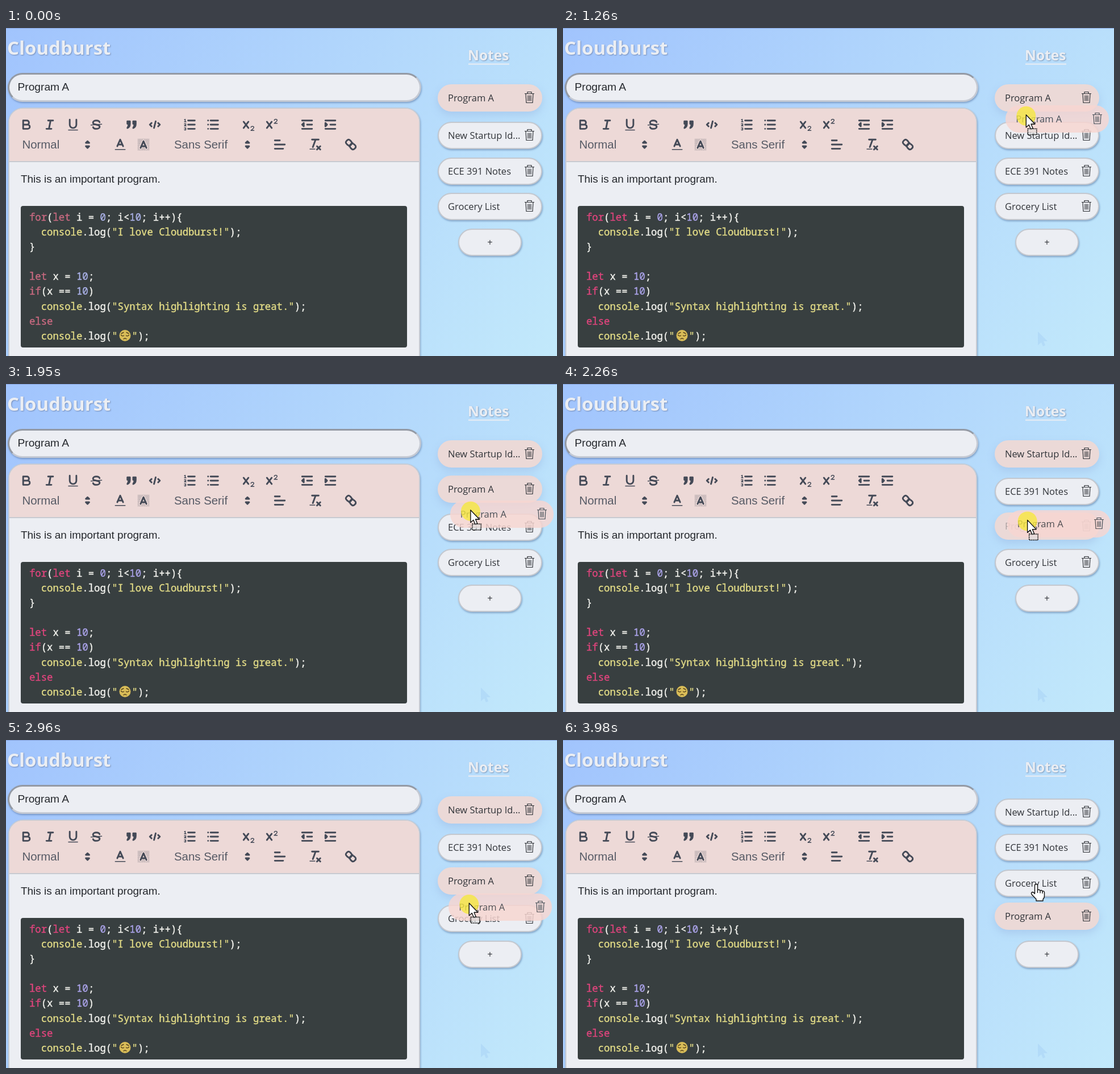
Animation, 970 px wide and 577 px high, one loop 4.05 s. Source, as an HTML page:

```html
<!DOCTYPE html>
<html lang="en">
<head>
<meta charset="utf-8">
<title>Notes editor</title>
<style>
html, body { margin: 0; width: 100%; height: 100%; overflow: hidden; }
body { position: relative; background: linear-gradient(120deg, #a1c4fd, #c2e9fb); }
body > * { position: absolute; box-sizing: border-box; }
svg { overflow: visible; }
#topline { left: 0; top: 0; width: 100%; height: 1px; background: #86a3dd; }
#title, #editor, .pill { background: #eceef3; box-shadow: 1px 2px 3px rgba(60, 90, 140, .45); }
#title { left: 3px; top: 79px; width: 728px; height: 51px; border: 3px solid; border-radius: 26px;
  border-color: #949aa4 #c4c9d3 #c4c9d3 #949aa4; }
#editor { left: 4px; top: 140px; width: 725px; height: 460px; border: 2px solid #c8ccd4;
  border-radius: 26px 26px 0 0; overflow: hidden; }
#bar { height: 92px; background: #edd9d7; border-bottom: 2px solid #c8cad1; }
#code { left: 26px; top: 313px; width: 680px; height: 249px; margin: 0; padding: 7px 15px; border-radius: 4px;
  background: #383f40; color: #f5f5f0; font: 500 17.3px/26.1px "Noto Sans Mono", monospace;
  -webkit-text-stroke: .4px; }
#code svg { width: 25px; height: 22px; vertical-align: -4.5px; }
.key { color: var(--key); }
.num { color: var(--num); }
.str { color: #e4dd87; }
#art { left: 0; top: 0; }
.head { font: bold 33px "Open Sans", sans-serif; fill: #ebeef3; text-shadow: 1px 1px 2px rgba(80, 95, 130, .55); }
.arial { font: 18.9px "Liberation Sans", Arial, sans-serif; fill: #24272c; }
.pick { font-size: 20.4px; fill: #575b66; }
.ico { fill: none; stroke: #444a57; stroke-width: 2; stroke-linecap: round; stroke-linejoin: round; }
.ico .f { fill: #444a57; }
.ico .thin { stroke-width: 1; }
.pill { left: 760px; width: 184px; height: 48px; padding-left: 16px; border: 2px solid #c4c8cf;
  border-radius: 24px; color: #303338; font: 16.5px/44px "Open Sans", sans-serif; white-space: nowrap; }
.pill svg { position: absolute; left: 151px; top: 10px; fill: none; stroke: currentColor; stroke-width: 1.2; }
.pill.up { background: #ebd9d7; border-color: #ebd9d7; box-shadow: 0 6px 14px rgba(150, 180, 225, .45); }
.pill.faint { color: rgba(48, 51, 56, .35); }
#add { left: 796px; top: 353px; width: 112px; padding: 0; text-align: center; }
#ghost { width: 182px; background: #f8d6d1; border-color: #f8d6d1; opacity: .83; box-shadow: none; }
#pointer { left: 0; top: 0; }
#pointer .ink { fill: #fff; stroke: #111; stroke-width: 1.4; stroke-linejoin: round; }
</style>
</head>
<body>
<div id="topline"></div>
<div id="title"></div>
<div id="editor"><div id="bar"></div></div>
<pre id="code"></pre>

<svg id="art" width="970" height="577">
  <defs>
    <pattern id="hatch" width="1.8" height="1.8" patternUnits="userSpaceOnUse">
      <path d="M.3 1.5L1.5 .3" stroke="#444a57" stroke-width=".5"/>
    </pattern>
  </defs>
  <text class="head" x="2" y="46.5">Cloudburst</text>
  <text class="head" x="813" y="57" style="font-size:24.5px">Notes</text>
  <path d="M814 63.5H886" stroke="#ebeef3" stroke-width="2"/>
  <text class="arial" x="20.5" y="109.5" style="font-size:19.2px">Program A</text>
  <text class="arial" x="26" y="272">This is an important program.</text>
  <text class="arial pick" x="28.5" y="212">Normal</text>
  <text class="arial pick" x="296" y="212">Sans Serif</text>
  <g id="icons" class="ico"></g>
  <path id="trace" d="M836 534v24l6-5 3 7 4-2-3-7h7z" fill="#9fc8f3" opacity=".35"/>
</svg>

<div id="add" class="pill">+</div>

<svg id="pointer" width="970" height="577">
  <g id="cursor">
    <circle id="press" cx="0" cy="2" r="17" fill="#f7e83c" opacity=".78"/>
    <path id="arrow" class="ink" d="M0 0V22L5 17.5 8.3 25.5 12 24 8.7 16.3H15.5Z"/>
    <path id="drop" d="M3 24.500h15.500v10.500h-15.500z" fill="#ddd" fill-opacity=".6" stroke="#111" stroke-width="1.5" stroke-dasharray="2 1"/>
    <path id="hand" class="ink" d="M-2.5 2a2.5 2.5 0 0 1 5 0V10q2.5-2 4.5 1 2.5-1.500 4 1 3-1 3.500 2V20q0 4-2.500 6v3H0V26L-8 17.500q-1.500-3 1.500-4 2 0 4 3ZM2.500 10v5M7 11v4.500M11 12v4"/>
  </g>
</svg>

<script>
const $ = id => document.getElementById(id);
const clamp = v => Math.max(0, Math.min(1, v));

// Code sample with a small highlighter
const sample = `for(let i = 0; i<10; i++){
  console.log("I love Cloudburst!");
}

let x = 10;
if(x == 10)
  console.log("Syntax highlighting is great.");
else
  console.log("@");`;
const face = `<svg viewBox="0 0 25 22"><circle cx="12.500" cy="11" r="10" fill="#d9bd58"/>
<path d="M5.500 10q2.500 3 5 1M14.500 11q2.500 2 5-1M10 17q2.500-2 5 0M6 7.500l4-2M15 5.500l4 2"
fill="none" stroke="#59451f" stroke-width="1.4" stroke-linecap="round"/></svg>`;
$('code').innerHTML = sample.replace('<', '&lt;')
  .replace(/("[^"]*"|console)|\b(for|let|if|else)\b|(\d+)/g, (m, str, key) =>
    `<span class="${str ? 'str' : key ? 'key' : 'num'}">${m}</span>`)
  .replace('@', face);

// Toolbar icons on an 18-unit grid
const line = (d, cls = '') => `<path class="${cls}" d="${d}"/>`;
const two = (x, y) => line(`M${x} ${y + 1.3}q.4-1.300 1.800-1.300 1.700 0 1.700 1.400 0 1-3.500 3.600h3.700`, 'thin');
const cross = line('M3.700 5.500L9.500 13M9.500 5.500L3.700 13');
const arrows = line('M7 11L9 13 11 11ZM7 7L9 5 11 7Z', 'f');
const loop = 'M8.900 4.600a3.500 3.500 0 0 1 .400 4.700 3.500 3.500 0 0 1-4.700-.400C3.200 7.500 2 6.400 4.200 4.200S7.500 3.200 8.900 4.600Z';
const icons = [
  [36, 170, line('M5 4H9.500a2.500 2.500 0 0 1 0 5H5ZM5 9h5.500a2.500 2.500 0 0 1 0 5H5Z')],
  [77, 170, line('M7 4H13M5 14H11M8 14L10 4')],
  [118, 170, line('M5 3V9a4 4 0 0 0 8 0V3') + line('M3.500 15.500H14.500', 'thin')],
  [159, 170, line('M12.900 6C12.500 4.800 11 4 9 4 6.800 4 5 5 5 6.500 5 8.600 8 8.700 9 9s4 .400 4 2.500C13 13 11.200 14 9 14 7 14 5.500 13.200 5.100 12')
    + line('M2.500 9.500L15.500 8.500', 'thin')],
  [221, 170, line('M4 5h3v3q0 4-3 5 1.500-2 1.500-5H4ZM11 5h3v3q0 4-3 5 1.500-2 1.500-5H11Z', 'f')],
  [262, 170, line('M5 7L3 9 5 11M13 7L15 9 13 11M10 5L8 13')],
  [323.5, 170, line('M7 4H15M7 9H15M7 14H15')
    + line('M2.500 3l1-.500v3m-1 0h2M2.500 8.200q1-1 1.800 0 .300 1-1.800 2.300h2M2.500 13q1.500-.800 1.800.300L3.700 14q1 .500.300 1.300-1 .500-1.500-.300', 'thin')],
  [364.5, 170, line('M6 4H15M6 9H15M6 14H15M3 4h0M3 9h0M3 14h0')],
  [426, 170, cross + two(12.5, 11)],
  [467, 170, cross + two(12.5, 2.5)],
  [530, 170, line('M3 14H15M3 4H15M9 9H15') + line('M5 7V11L3 9Z', 'f')],
  [571, 170, line('M3 14H15M3 4H15M9 9H15') + line('M3 7V11L5 9Z', 'f')],
  [143.5, 205, arrows],
  [201, 205, line('M5.500 11L9 3 12.500 11M11.600 9H6.400') + line('M3 15H15', 'thin')],
  [242, 205, '<rect x="2" y="2" width="14" height="14" fill="url(#hatch)" stroke="none"/>'
    + '<path d="M5.500 13L9 5 12.500 13" stroke="#edd9d7" stroke-width="4"/>' + line('M5.500 13L9 5 12.500 13M11.600 11H6.400')],
  [425, 205, arrows],
  [482, 205, line('M3 9H15M3 14H13M3 4H9')],
  [544.5, 205, line('M5 3H13M6 12L9.350 3M11 11L15 15M15 11L11 15') + line('M2.500 14.500H8.500', 'thin')],
  [607, 205, line('M7 11L11 7' + loop) + `<path d="${loop}" transform="rotate(180 9 9)"/>`]
];
$('icons').innerHTML = icons.map(([x, y, art]) =>
  `<g transform="translate(${x - 13.1} ${y - 13.1}) scale(1.46)">${art}</g>`).join('');

// Note pills
const trash = `<svg width="18" height="24"><path d="M0 4.500H17M5 4V1.500H12V4M2 4.500L3 20.500H14L15 4.500M6 7.500V17.500M8.500 7.500V17.500M11 7.500V17.500"/></svg>`;
function pill(text) {
  const el = document.createElement('div');
  el.className = 'pill';
  el.innerHTML = text + trash;
  document.body.insertBefore(el, $('pointer'));
  return el;
}
const [program, startup, course, grocery] =
  ['Program A', 'New Startup Id...', 'ECE 391 Notes', 'Grocery List'].map(pill);
const others = [startup, course, grocery];
const ghost = pill('Program A');
ghost.id = 'ghost';

// Pointer moves: start, end, number of steps, x and y reached
const moves = [
  [130, 450, 5, 813, 155], [610, 850, 4, 813, 127], [1020, 1490, 7, 817, 172],
  [1580, 2040, 7, 818, 230], [2120, 2640, 8, 817, 255], [2720, 3180, 7, 814, 311],
  [3280, 3730, 7, 814, 333], [3830, 3980, 3, 833, 254]
];
const swaps = [1580, 2120, 2980], grab = 1020, release = 3730, period = 4050;

function pointerAt(t) {
  let x = 836, y = 534;
  for (const [a, b, n, tx, ty] of moves) {
    if (t < a) break;
    const p = clamp((Math.round((t - a) / (b - a) * (n - 1)) + 1) / n);
    x += (tx - x) * p;
    y += (ty - y) * p;
  }
  return [x, y];
}

const show = (el, on) => el.style.display = on ? '' : 'none';
const rise = (t, start) => 4 * clamp((t - start - 60) / 200);

function place(el, slot, lift, up) {
  el.style.top = 127 + 62.4 * slot - lift - 24 + 'px';
  el.classList.toggle('up', up);
}

function draw(t) {
  const [x, y] = pointerAt(t);
  const drag = t >= grab && t < release;
  const hand = t >= 700 && t < grab || t >= 3830;
  const slot = swaps.filter(s => t >= s).length;
  const lift = slot ? rise(t, swaps[slot - 1]) : 4;
  const hover = slot > 0 && t < release;

  place(program, slot, lift, true);
  others.forEach((el, i) => place(el, i < slot ? i : i + 1, 0, false));
  if (slot) place(startup, 0, hover ? rise(t, swaps[0]) : 4 - rise(t, release - 60), hover);

  const over = Math.abs(y - (123 + 62.4 * slot)) < 24;
  program.classList.toggle('faint', drag && over);
  ghost.style.left = x - 36 + 'px';
  ghost.style.top = y - 17 + 'px';
  show(ghost, drag);

  $('cursor').setAttribute('transform', `translate(${x} ${y})`);
  show($('cursor'), t >= 130);
  show($('trace'), t >= 130);
  show($('press'), drag);
  show($('drop'), drag);
  show($('arrow'), !hand);
  show($('hand'), hand);

  const root = document.body.style;
  root.setProperty('--key', t < 130 ? '#c96a80' : '#e0457d');
  root.setProperty('--num', t < 130 ? '#a9b0e6' : '#aaa2e8');
}

const begin = performance.now();
function tick() {
  draw((performance.now() - begin) % period);
  requestAnimationFrame(tick);
}
tick();
</script>
</body>
</html>
```
